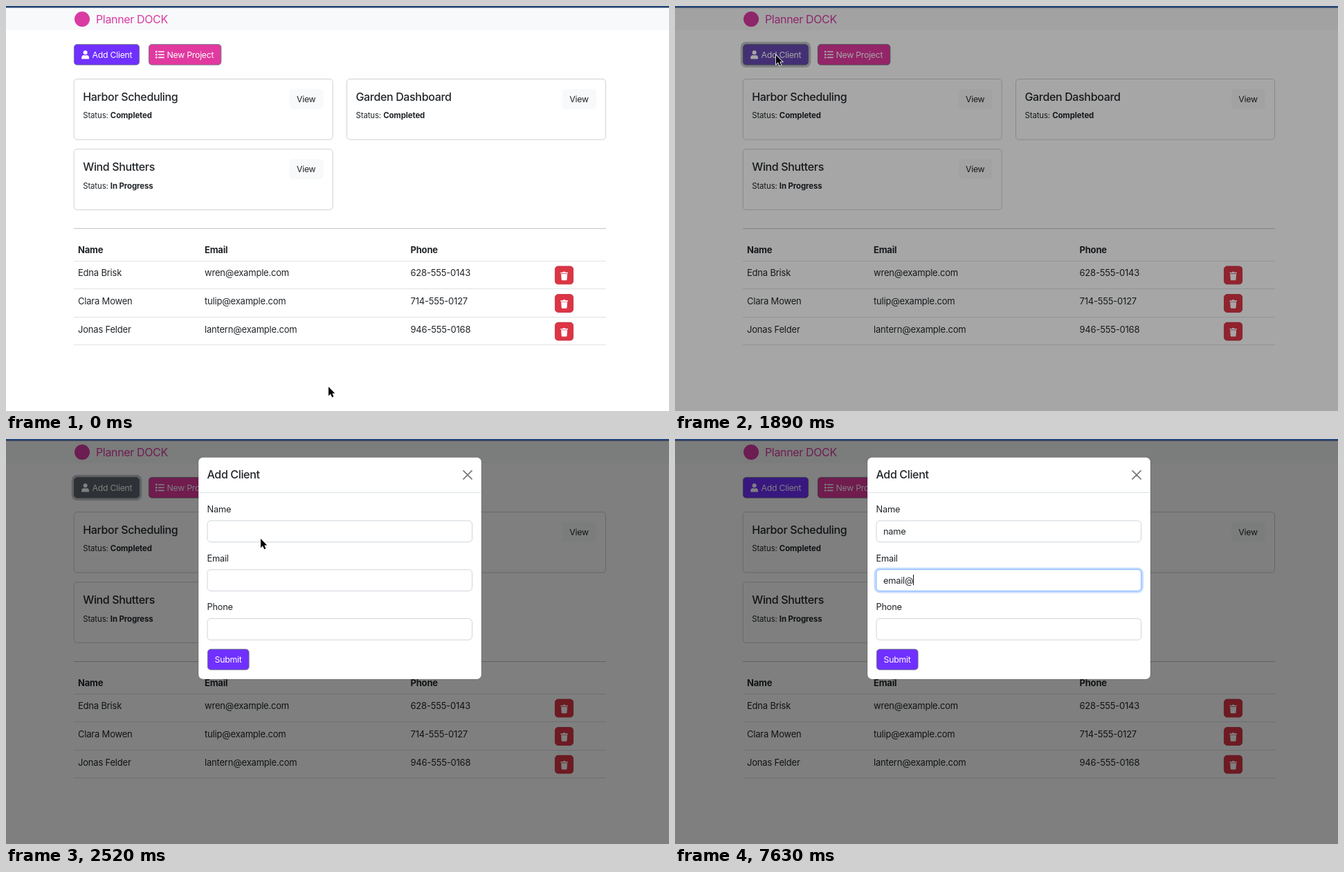
Write an HTML page that moves like this. It is 958 px wide and 585 px high and loops after 8 s.

```html
<!DOCTYPE html>
<html lang="en">
<head>
<meta charset="utf-8">
<title>Client list</title>
<style>
  html, body { margin: 0; width: 100%; height: 100%; overflow: hidden; background: #fff; }
  svg { display: block; width: 958px; height: 585px; }
  text { font: 400 12.8px Inter, sans-serif; letter-spacing: -.22px; fill: #212529; white-space: pre; }
  .head { font-size: 16px; font-weight: 500; letter-spacing: -.35px; }
  .brand { font-weight: 400; fill: #d93ba3; }
  .btn { font-size: 12.3px; letter-spacing: -.25px; }
  .mid { text-anchor: middle; }
  .white { fill: #fff; }
  .small { font-size: 11.4px; letter-spacing: -.1px; }
  .bold { font-weight: 700; }
  .cell { font-size: 13px; letter-spacing: -.2px; }
</style>
</head>
<body>
<svg id="stage" viewBox="0 0 958 585" xmlns="http://www.w3.org/2000/svg"></svg>
<script>
const LOOP = 8000, TICK = 70;
const PURPLE = '#7030ff', PINK = '#e1399f', RED = '#dc3545';
const EDGE = '#6c757d', EDGE_HOVER = '#565e64', PRESSED = '#5c636a';
const stage = document.getElementById('stage');

// markup helpers
const rect = (x, y, w, h, r, attrs) =>
  `<rect x="${x}" y="${y}" width="${w}" height="${h}" rx="${r}" ${attrs}/>`;
const button = (x, y, w, h, fill, edge, attrs = '') =>
  rect(x + .4, y + .4, w - .8, h - .8, 4.4, `fill="${fill}" stroke="${edge}" stroke-width=".85" ${attrs}`);
const label = (x, y, str, cls = '', attrs = '') =>
  `<text x="${x}" y="${y}" class="${cls}" ${attrs}>${str}</text>`;
const rule = (x1, x2, y, color) =>
  `<path d="M${x1} ${y}H${x2}" stroke="${color}"/>`;

const card = (x, y, title, status) =>
  rect(x, y, 374, 87.5, 4.5, 'fill="none" stroke="#d0d0d0"') +
  rect(x + 311.3, y + 14.5, 49, 29, 5, 'fill="#f8f9fa"') +
  label(x + 335.5, y + 33.4, 'View', 'btn mid') +
  label(x + 13, y + 31, title, 'head') +
  label(x + 13, y + 56.7, `Status: <tspan class="bold">${status}</tspan>`, 'small');

const clients = [
  ['Edna Brisk', 'wren@example.com', '628-555-0143'],
  ['Clara Mowen', 'tulip@example.com', '714-555-0127'],
  ['Jonas Felder', 'lantern@example.com', '946-555-0168']
];
const columns = [104, 287, 584.5];
const rowY = i => 368.5 + i * 40.6;

const clientRow = (row, i) =>
  row.map((str, c) => label(columns[c], rowY(i) + 21.8, str, 'cell')).join('') +
  rule(98, 867, Math.round(rowY(i + 1)) - .5, '#dee2e6') +
  `<g transform="translate(793 ${rowY(i) + 7})">
    ${button(0, 0, 27, 26.7, RED, '#c5303f')}
    <path class="white" d="M8.3 9.2h3.3l.7-1h2.6l.7 1h3.3v1.6H8.3zM9.1 11.5h9l-.6 8.2q-.1 1-1.1 1h-5.6q-1 0-1.1-1z"/>
  </g>`;

const listIcon = [66, 70.2, 74.4].map(y =>
  `<path class="white" d="M216 ${y - 1.2}h2.5v2.4h-2.5zM220 ${y - .8}h8.7v1.6h-8.7z"/>`).join('');

const field = (i, name) => {
  const y = 118 + i * 70.7;
  return label(290.5, y - 12, name) +
    rect(289.3, y - 1.2, 385.9, 33.2, 6.5, `id="glow${i}" fill="none" stroke="#c2dbfe" stroke-width="3.4"`) +
    rect(291, y, 382.5, 30.8, 5, `id="box${i}" fill="#fff"`) +
    label(301, y + 20, '', '', `id="value${i}"`);
};

stage.innerHTML = `
  <rect width="958" height="585" fill="#fff"/>
  <rect y="2" width="958" height="33" fill="#f8f9fa"/>
  <rect y="2" width="958" height="1" fill="#7f8fa8"/>
  <circle cx="110" cy="19" r="11" fill="#d93ba3"/>
  ${label(130, 24.6, 'Planner DOCK', 'head brand')}
  ${rect(96.4, 53.4, 98.2, 33.7, 6, 'id="ring" fill="none" stroke="#c1c5c8" stroke-width="3.3"')}
  ${button(98, 55, 95, 30.5, PURPLE, EDGE, 'id="add"')}
  <circle class="white" cx="114.6" cy="67.2" r="3"/>
  <path class="white" d="M109.2 76.4v-1.6q0-3.6 3.6-3.8 1.8.8 3.6 0 3.6.2 3.6 3.8v1.6z"/>
  ${label(124.5, 75, 'Add Client', 'btn white')}
  ${button(206, 55, 105.3, 30.5, PINK, EDGE)}
  ${listIcon}
  ${label(232.5, 75, 'New Project', 'btn white')}
  ${card(98.2, 105.5, 'Harbor Scheduling', 'Completed')}
  ${card(492.5, 105.5, 'Garden Dashboard', 'Completed')}
  ${card(98.2, 206.8, 'Wind Shutters', 'In Progress')}
  ${rule(98, 867, 321.5, '#c4c5c6')}
  ${['Name', 'Email', 'Phone'].map((s, c) => label(columns[c], 356.8, s, 'cell bold')).join('')}
  ${rule(98, 867, 368.5, '#dee2e6')}
  ${clients.map(clientRow).join('')}
  <rect id="shade" width="958" height="585"/>
  <rect width="958" height="2" fill="#224577"/>
  <g id="modal">
    ${rect(278, 26.5, 409, 320.5, 6.5, 'fill="#fff" stroke="#000" stroke-opacity=".2"')}
    ${label(290.5, 57.3, 'Add Client', 'head')}
    <path d="M661 45.8l12 12m0-12l-12 12" stroke="#7c7c7c" stroke-width="1.8" stroke-linecap="round"/>
    ${rule(278, 687, 77.5, '#dee2e6')}
    ${['Name', 'Email', 'Phone'].map((s, i) => field(i, s)).join('')}
    ${button(291, 303.3, 60.5, 30.4, PURPLE, EDGE)}
    ${label(321, 323, 'Submit', 'btn mid white')}
    <rect id="caret" width="1" height="15" fill="#111"/>
  </g>
  <path id="arrow" d="M0 0V13L3 10.3 5.2 15.2 7.4 14.2 5.3 9.5H9.2Z" stroke="#fff" stroke-width="1.6" paint-order="stroke"/>
  <path id="beam" d="M-2.5 -6q2.5 0 2.5 1.5V5q0 1.5 -2.5 1.5M2.5 -6Q0 -6 0 -4.5M0 5q0 1.5 2.5 1.5M-1.5 2.5h3" fill="none" stroke="#111" stroke-width="1.1"/>`;

const el = id => document.getElementById(id);
const set = (id, name, v) => el(id).setAttribute(name, v);
const show = (id, on) => el(id).style.visibility = on ? 'visible' : 'hidden';

// timing helpers
const ramp = (t, from, to) => Math.min(1, Math.max(0, (t - from) / (to - from)));
const smooth = k => k * k * (3 - 2 * k);
const easeOut = k => 1 - (1 - k) ** 2.2;
const mix = (a, b, k) => {
  const part = (c, i) => parseInt(c.slice(i, i + 2), 16);
  return `rgb(${[1, 3, 5].map(i => Math.round(part(a, i) + (part(b, i) - part(a, i)) * k))})`;
};

// pointer stops: time, x, y
const route = [
  [0, 466, 550], [70, 462, 535], [280, 380, 330], [490, 240, 110], [630, 165, 23],
  [700, 139, 38], [840, 150, 74], [1330, 150, 74], [1540, 146, 71], [1960, 146, 71],
  [2310, 319, 176], [2450, 319, 176], [2520, 368, 144], [2590, 369, 140], [2730, 369, 137]
];
function pointer(t) {
  const i = route.findIndex(p => p[0] > t);
  if (i < 0) return route[route.length - 1].slice(1);
  const a = route[i - 1], b = route[i], k = ramp(t, a[0], b[0]);
  return [a[1] + (b[1] - a[1]) * k, a[2] + (b[2] - a[2]) * k];
}

// focus or key press: time, field, text
const keys = [
  [2910, 0, ''], [4690, 0, 'n'], [4830, 0, 'na'], [4970, 0, 'nam'], [5110, 0, 'name'],
  [5530, 1, ''], [6370, 1, 'e'], [6510, 1, 'em'], [6650, 1, 'ema'], [6790, 1, 'emai'],
  [7040, 1, 'email'], [7630, 1, 'email@']
];
const BLINK = 520;

function drawForm(t) {
  const past = keys.filter(k => k[0] <= t);
  const last = past[past.length - 1];
  [0, 1].forEach(i => {
    const own = past.filter(k => k[1] === i).pop();
    el('value' + i).textContent = own ? own[2] : '';
  });
  const toEmail = ramp(t, 5490, 5660);
  const focus = [ramp(t, 2900, 3070) * (1 - toEmail), toEmail, 0];
  focus.forEach((k, i) => {
    set('glow' + i, 'opacity', k);
    set('box' + i, 'stroke', mix('#ced4da', '#86b7fe', k));
  });
  const lit = last && Math.floor((t - last[0]) / BLINK) % 2 === 0;
  show('caret', lit);
  if (lit) {
    const w = last[2] ? el('value' + last[1]).getComputedTextLength() : 0;
    set('caret', 'x', Math.round(301 + w));
    set('caret', 'y', last[1] ? 196 : 126);
  }
}

function draw(t) {
  const blur = 1 - ramp(t, 2900, 3070);
  set('shade', 'opacity', .5 * smooth(ramp(t, 1785, 1950)));
  set('add', 'fill', mix(PURPLE, PRESSED, ramp(t, 1820, 1955) * blur));
  set('add', 'stroke', mix(EDGE, EDGE_HOVER, ramp(t, 1370, 1540) * blur));
  set('ring', 'opacity', ramp(t, 1700, 1810) * blur);

  set('modal', 'opacity', ramp(t, 1960, 2110));
  set('modal', 'transform', `translate(0 ${-42 * (1 - easeOut(ramp(t, 1960, 2260)))})`);
  drawForm(t);

  const [x, y] = pointer(t), inField = t >= 2590;
  show('arrow', !inField);
  show('beam', inField && t < 4690);
  ['arrow', 'beam'].forEach(id => set(id, 'transform', `translate(${x} ${y})`));
}

const start = performance.now();
function tick() {
  const t = (performance.now() - start) % LOOP;
  draw(Math.floor(t / TICK) * TICK);
  requestAnimationFrame(tick);
}
tick();
</script>
</body>
</html>
```
